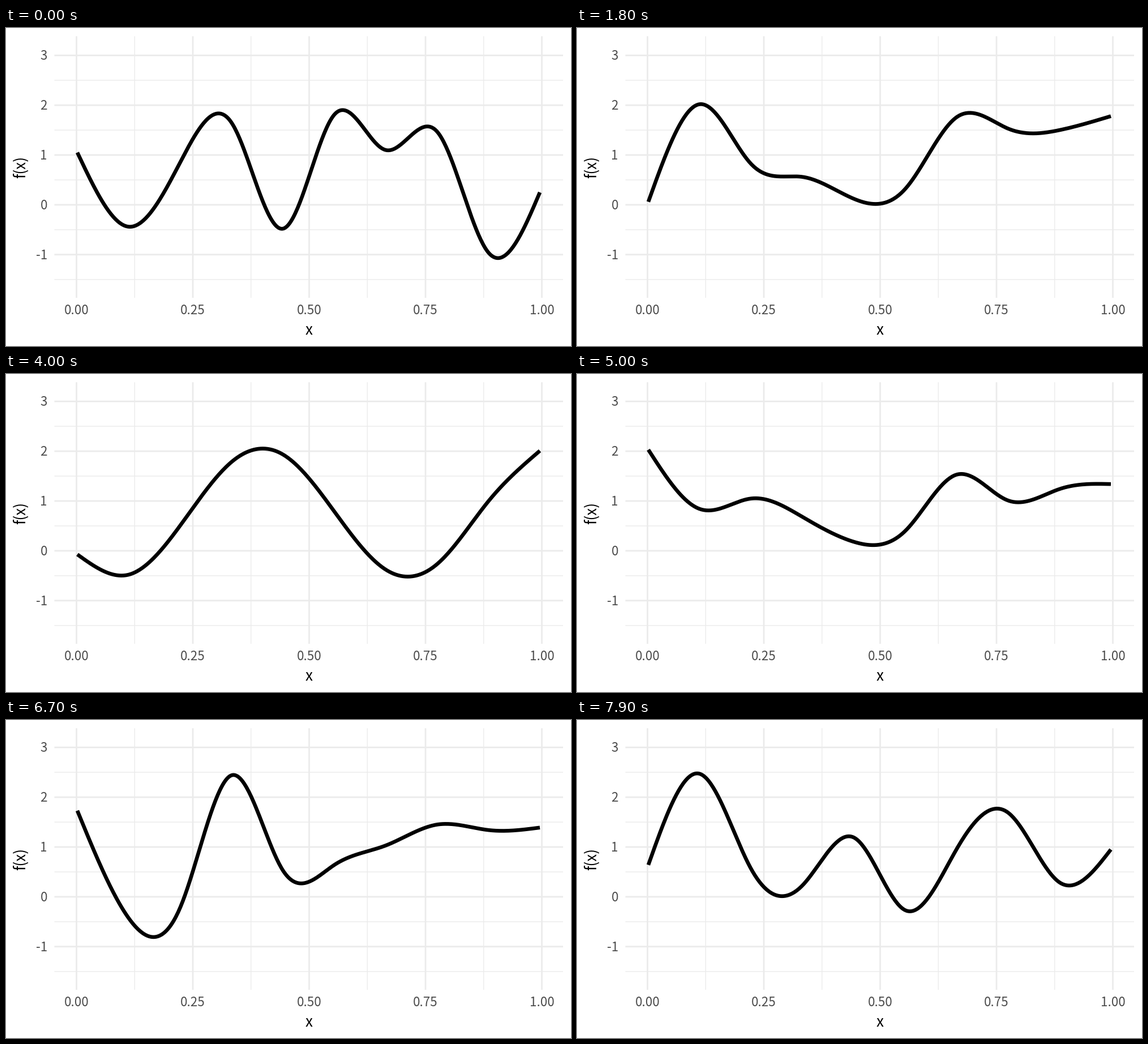
Write a matplotlib script that moves like this. It is 998x561 px and loops after 8000 ms.

```python
import matplotlib.pyplot as plt
import numpy as np
from matplotlib.animation import FuncAnimation

W, H, DPI = 998, 561, 100
FRAMES, INTERVAL = 80, 100
PX = 72 / DPI  # points per pixel
FONT = "Noto Sans CJK JP"
X0, XSTEP = 124, 822
Y0, YSTEP = 311.4, 87.85
LEFT, RIGHT, TOP, BOTTOM = 85, 983.5, 14, 475.5
KNOTS, SAMPLES = 10, 400


def to_x(v):
    return X0 + XSTEP * v


def to_y(v):
    return Y0 - YSTEP * v


def ease(p):
    """Cubic in and out."""
    return 4 * p**3 if p < 0.5 else 1 - 4 * (1 - p) ** 3


def extend(start, partway, p):
    """End state of a tween that passes through `partway` at progress p."""
    return start + (partway - start) / ease(p)


def spline_basis(n, samples):
    """Matrix that maps n even knots to points of a natural cubic spline."""
    e = np.eye(n)
    a, d = e.copy(), np.zeros((n, n))
    for i in range(1, n - 1):
        a[i, i - 1:i + 2] = 1, 4, 1
        d[i, i - 1:i + 2] = 6, -12, 6
    m = np.linalg.solve(a, d)
    u = np.linspace(0, n - 1, samples)
    k = np.minimum(u.astype(int), n - 2)
    f = (u - k)[:, None]
    g = 1 - f
    return g * e[k] + f * e[k + 1] + ((g**3 - g) * m[k] + (f**3 - f) * m[k + 1]) / 6


def knots(*values):
    return np.array(values)


# Each curve is a spline through ten even key points.
first = knots(1.05, -.44, .85, 1.65, -.48, 1.81, 1.10, 1.47, -.96, .25)
second = knots(1.40, 1.68, 2.26, .76, 2.28, -.46, .23, 1.05, 2.66, .13)
to_third = knots(.06, 2.02, .82, .56, .12, .32, 1.76, 1.53, 1.50, 1.78)
fourth = knots(.94, .69, .32, 1.74, .74, .93, .61, .10, 1.18, .04)
sixth = knots(2.03, .84, 1.05, .68, .18, .40, 1.53, 1.01, 1.24, 1.34)
to_eighth = knots(1.73, -.43, -.22, 2.44, .53, .64, 1.03, 1.45, 1.34, 1.39)
to_ninth = knots(.64, 2.47, .56, .23, 1.19, -.27, .96, 1.69, .29, .95)

third = extend(second, to_third, 4 / 6)
fifth = 0.77 + 1.29 * np.cos(10 * (np.linspace(0, 1, KNOTS) - 0.4))
seventh = to_eighth.copy()
seventh[1:3] -= 0.45
eighth = extend(seventh, to_eighth, 3 / 6)
ninth = extend(eighth, to_ninth, 5 / 6)
STATES = [first, second, third, fourth, fifth, sixth, seventh, eighth, ninth]

fig = plt.figure(figsize=(W / DPI, H / DPI), dpi=DPI, facecolor="white")
ax = fig.add_axes([0, 0, 1, 1])
ax.set_xlim(-0.5, W - 0.5)
ax.set_ylim(H - 0.5, -0.5)
ax.axis("off")


def grid(xs, ys, width):
    style = dict(color="#EBEBEB", linewidth=width * PX, snap=False, zorder=1)
    ax.vlines(to_x(xs), TOP, BOTTOM, **style)
    ax.hlines(to_y(ys), LEFT, RIGHT, **style)


def label(x, y, text, size=22.4, color="#4D4D4D", ha="center", rotation=0):
    ax.text(x, y, text, fontsize=size * PX, color=color, fontfamily=FONT, ha=ha,
            va="baseline", rotation=rotation, rotation_mode="anchor")


ticks_x = np.arange(5) / 4
ticks_y = np.arange(-1, 4)
grid(ticks_x[:-1] + 0.125, ticks_y - 0.5, 1.36)
grid(ticks_x, ticks_y, 2.71)

for v in ticks_x:
    label(to_x(v), 505, f"{v:.2f}")
for v in ticks_y:
    label(72.5, to_y(v) + 8, f"{v}", ha="right")
label(534.5, 540.5, "x", 26, "black")
label(33, 245, "f(x)", 26, "black", rotation=90)

basis = spline_basis(KNOTS, SAMPLES)
curve, = ax.plot(np.linspace(125.5, 942.5, SAMPLES), to_y(basis @ first),
                 color="black", linewidth=6.6 * PX, solid_capstyle="butt",
                 solid_joinstyle="round", zorder=2)


def update(frame):
    # Each tween ends on a full second; the first one is a step longer.
    state = max(frame - 1, 0) // 10
    steps = 7 if state == 0 else 6
    p = ease(max(0, 1 - (10 * (state + 1) - frame) / steps))
    mix = (1 - p) * STATES[state] + p * STATES[state + 1]
    curve.set_ydata(to_y(basis @ mix))
    return curve,


anim = FuncAnimation(fig, update, frames=FRAMES, interval=INTERVAL,
                     repeat=True, repeat_delay=0)
plt.show()
```
